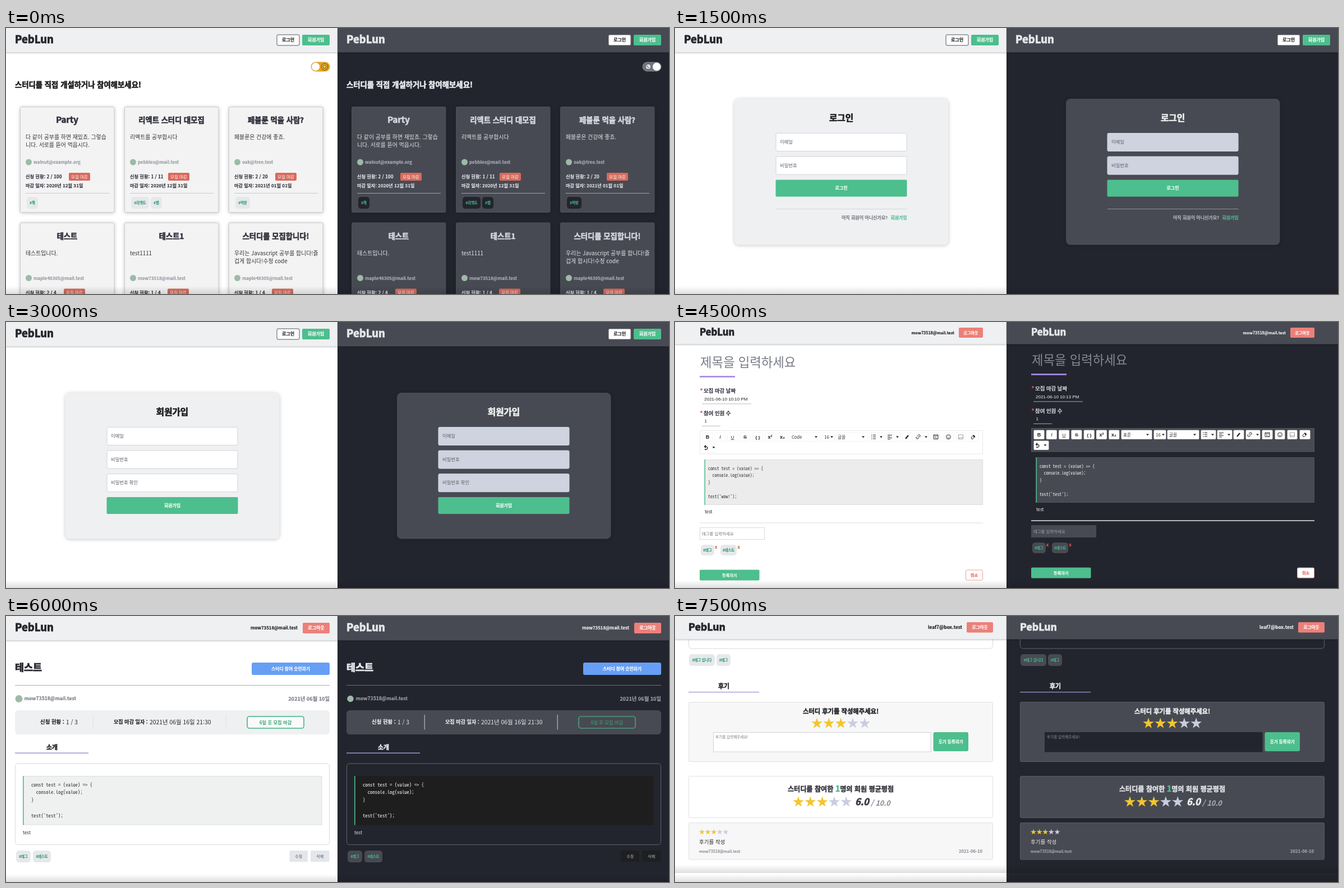
Animation of 1182 by 474 pixels, one loop 8 s. Source, as an HTML page:

```html
<!DOCTYPE html>
<html lang="ko">
<head>
<meta charset="utf-8">
<title>Study board</title>
<style>
html, body { margin: 0; width: 100%; height: 100%; overflow: hidden; background: #fff; }
svg { display: block; width: 1182px; height: 474px; }
text { font-family: "Noto Sans CJK KR", "Noto Sans CJK", "Noto Sans CJK JP", "Noto Sans", sans-serif; white-space: pre; }
text.mono { font-family: "Noto Sans Mono CJK KR", "Noto Sans Mono", monospace; font-weight: 500; }
text.arial { font-family: "Liberation Sans", Arial, sans-serif; }
.shadow { filter: drop-shadow(0 1px 3px rgba(0,0,0,.22)); }
.bar { filter: drop-shadow(0 1px 1px rgba(0,0,0,.28)); }
</style>
</head>
<body>
<svg id="stage" viewBox="0 0 1182 474">
  <defs>
    <linearGradient id="fade" x2="0" y2="1">
      <stop offset="0" stop-opacity="0"/>
      <stop offset="1" stop-opacity=".13"/>
    </linearGradient>
  </defs>
</svg>
<script>
const stage = document.getElementById('stage');
const HALF = 591, STEP = 1500, LOOP = 8000;
const GREEN = '#4dbe8d', CORAL = '#ec8079', VIOLET = '#a78bea', LILAC = '#a091d6';
const BRAND = 'PebLun', MEMBER = 'mow73518@mail.test', AUTHOR = 'maple48305@mail.test';

// Advance of one monospace letter at a font size of one pixel.
const pen = document.createElement('canvas').getContext('2d');
pen.font = '500 100px "Noto Sans Mono CJK KR", "Noto Sans Mono", monospace';
const MONO_EM = pen.measureText('m').width / 100;

let parent = stage, dark = false;
const pick = (light, night) => dark ? night : light;

function add(tag, attrs, content) {
  const el = document.createElementNS('http://www.w3.org/2000/svg', tag);
  for (const key in attrs) el.setAttribute(key, attrs[key]);
  if (content !== undefined) el.textContent = content;
  return parent.appendChild(el);
}
function group(attrs, draw) {
  const outer = parent;
  const el = parent = add('g', attrs);
  draw();
  parent = outer;
  return el;
}
// Boxes are given by their edges.
const box = (x1, y1, x2, y2, fill, opt = {}) =>
  add('rect', { x: x1, y: y1, width: x2 - x1, height: y2 - y1, fill, ...opt });
const path = (d, stroke, opt = {}) => add('path', { d, stroke, fill: 'none', ...opt });
const circle = (cx, cy, r, fill, opt = {}) => add('circle', { cx, cy, r, fill, ...opt });
const text = (x, y, size, str, fill, opt = {}) =>
  add('text', { x, y, 'font-size': size, fill, ...opt }, str);
// A thin outline gives the heavy look of the display face.
const heavy = (ratio) => (x, y, size, str, fill, opt = {}) =>
  text(x, y, size, str, fill, { 'font-weight': 700, stroke: fill, 'stroke-width': size * ratio, ...opt });
const bold = heavy(.022), black = heavy(.045);
const MID = { 'text-anchor': 'middle' }, END = { 'text-anchor': 'end' };
const hline = (x1, x2, y, stroke, width = 1) =>
  path(`M${x1} ${y}H${x2}`, stroke, { 'stroke-width': width });

function button(x1, y1, x2, y2, label, size, fill, color = '#fff', opt = {}) {
  box(x1, y1, x2, y2, fill, { rx: 2, ...opt });
  bold((x1 + x2) / 2, (y1 + y2) / 2 + size * .36, size, label, color, MID);
}
function tag(x1, y1, x2, y2, label, night = '#484a53') {
  box(x1, y1, x2, y2, pick('#e6e8eb', night), { rx: 5 });
  bold((x1 + x2) / 2, (y1 + y2) / 2 + 2.2, 6.3, label, pick('#2f9b74', '#45b386'), MID);
}
function star(cx, cy, r, fill) {
  let d = '';
  for (let i = 0; i < 10; i++) {
    const a = (i / 5 - .5) * Math.PI, k = i % 2 ? r * .39 : r;
    d += (i ? 'L' : 'M') + (cx + k * Math.cos(a)).toFixed(2) + ' ' + (cy + k * Math.sin(a)).toFixed(2);
  }
  add('path', { d: d + 'Z', fill });
}
function stars(x, y, r, gap) {
  for (let i = 0; i < 5; i++) star(x + i * gap, y, r, i < 3 ? '#f2c530' : '#c8cde0');
}
const avatar = (x, y, r) => circle(x, y, r, '#9dbaa8');

function header(h, x, y, size) {
  box(0, 0, HALF, h, pick('#eff0f2', '#484a53'), { class: 'bar' });
  black(x, y, size, BRAND, pick('#26272c', '#e6e7eb'));
}
function guestHeader() {
  header(43.5, 16, 27, 18.6);
  button(483, 12, 523, 31, '로그인', 8, '#fff', '#222', { stroke: '#55575e' });
  button(528, 12, 577, 31, '회원가입', 8, GREEN);
}
function memberHeader(h, logo, mail, mailEnd, baseline, size, btn, btnSize) {
  header(h, ...logo);
  bold(mailEnd, baseline, size, mail, pick('#222', '#f0f0f3'), END);
  button(...btn, '로그아웃', btnSize, CORAL);
}
function code(x, [top, gap], advance, value) {
  const rows = ['const test = (value) => {', '  console.log(value);', '}', '', `test('${value}');`];
  rows.forEach((row, i) =>
    text(x, top + i * gap, advance / MONO_EM, row, pick('#2b2b2b', '#fff'), { class: 'mono' }));
}

function toggle() {
  box(544, 61, 577, 77, pick('#eda11f', '#71747d'), { rx: 8, stroke: pick('#c98a25', '#8b8d95'), 'stroke-width': .8 });
  circle(pick(552, 569), 69, 7.2, '#fff');
  if (dark) {
    circle(554, 69, 5, '#dcdee4', { stroke: '#4a4c55' });
    path('M552 66a4 4 0 0 0 4 5', '#555862');
  } else {
    circle(568, 69, 5.6, '#f6c343', { stroke: '#5b4316', 'stroke-width': 1.6, 'stroke-dasharray': '1.5 1' });
    circle(568, 69, 3, 'none', { stroke: '#5b4316', 'stroke-width': .9 });
  }
}
function card(x, y, { title, size = 13.3, desc, mail, count, badge, due, tags = [] }) {
  group({ transform: `translate(${x} ${y})` }, () => {
    const ink = pick('#3a3b48', '#dddfe6');
    box(.5, .5, 168, 188.5, pick('#f3f3f3', '#484a53'),
      { rx: 2, class: 'shadow', stroke: pick('#c9cace', '#4d4f58') });
    black(84, 29, size, title, pick('#33343f', '#d3d5de'), MID);
    desc.forEach((row, i) => text(10, 58 + i * 14.2, 9.9, row, pick('#333', '#e3e4ea')));
    avatar(15.5, 99, 5.5);
    bold(24, 102, 7.9, mail, pick('#9a9ca6', '#a9abb6'));
    bold(10, 128, 8.2, '신청 현황: ' + count, ink);
    box(badge, 118, badge + 38, 132, '#d96a5c', { rx: 2 });
    text(badge + 19, 127.7, 7.4, '모집 마감', '#fff', MID);
    if (!due) return;
    bold(10, 143.5, 8.15, '마감 일자: ' + due, ink);
    hline(10, 159, 154.5, pick('#c9cace', '#a0a2aa'));
    tags.forEach(([x1, x2, label]) => tag(x1, 161, x2, 182, label, '#23252e'));
  });
}
function listScene() {
  guestHeader();
  toggle();
  black(16, 106, 13.35, '스터디를 직접 개설하거나 참여해보세요!', pick('#222', '#e8e9ee'));
  const top = [
    { title: 'Party', size: 15, desc: ['다 같이 공부를 하면 재밌죠. 그렇습', '니다. 서로를 뜯어 먹읍시다.'],
      mail: 'walnut@example.org', count: '2 / 100', badge: 87, due: '2020년 12월 31일', tags: [[12, 32, '#책']] },
    { title: '리액트 스터디 대모집', desc: ['리액트를 공부합시다'],
      mail: 'pebbles@mail.test', count: '1 / 11', badge: 78, due: '2020년 12월 31일', tags: [[12, 44, '#리액트'], [47, 67, '#웹']] },
    { title: '페블룬 먹을 사람?', desc: ['페블룬은 건강에 좋죠.'],
      mail: 'oak@tree.test', count: '2 / 20', badge: 83, due: '2021년 01월 01일', tags: [[12, 38, '#먹방']] }
  ];
  const low = [
    { title: '테스트', desc: ['테스트입니다.'], mail: AUTHOR, count: '2 / 4', badge: 78 },
    { title: '테스트1', desc: ['test1111'], mail: MEMBER, count: '1 / 4', badge: 77 },
    { title: '스터디를 모집합니다!', desc: ['우리는 Javascript 공부를 합니다!즐', '겁게 합시다!수정 code'], mail: AUTHOR, count: '1 / 4', badge: 77 }
  ];
  top.forEach((c, i) => card(25 + i * 186, 140, c));
  low.forEach((c, i) => card(25 + i * 186, 346.5, c));
}

function formScene(title, fields) {
  guestHeader();
  box(106, 126, 487.5, 386.5, pick('#eff0f2', '#484a53'), { rx: 8, class: 'shadow' });
  black(296.5, 166, 15.6, title, pick('#222', '#eceded'), MID);
  fields.forEach((label, i) => {
    const y = 187.5 + i * 41.6;
    box(180, y, 413, y + 32, pick('#fff', '#ced3df'), { rx: 2, stroke: pick('#d0d4da', '#d3d8e3') });
    text(187, y + 18.7, 8.3, label, '#5d5f66');
  });
  const y = 187.2 + fields.length * 41.6;
  button(179.5, y, 413.5, y + 30, title, 7.9, GREEN);
}
function loginScene() {
  formScene('로그인', ['이메일', '비밀번호']);
  hline(180, 413.5, 322.5, pick('#d3d6da', '#8e9098'));
  bold(297, 341, 8, '아직 회원이 아니신가요?', pick('#7b7d85', '#b3b5be'));
  bold(413.5, 341, 7.9, '회원가입', GREEN, END);
}
function signupScene() {
  formScene('회원가입', ['이메일', '비밀번호', '비밀번호 확인']);
}

function toolbar() {
  box(44.5, 193.5, 548.5, 235, pick('#fff', '#484a53'), { stroke: pick('#e9e9eb', '#53555e') });
  const ink = '#222';
  const cell = (x1, x2, y = 197) =>
    box(x1, y, x2, y + 15.5, '#fff', { rx: 1, stroke: pick('#f1f1f3', '#fff'), 'stroke-width': .8 });
  const arrow = (x, y = 204.7) => add('path', { d: `M${x - 2.5} ${y - 1.3}h5l-2.5 3z`, fill: ink });
  const glyph = (x, str, opt = {}) => text(x, 208, 9, str, ink, { ...MID, class: 'arial', ...opt });
  const draw = (d, opt) => path(d, ink, opt);
  for (let i = 0; i < 7; i++) cell(49 + i * 22.3, 67 + i * 22.3);
  [[205, 259], [263, 284], [287, 343], [347, 373], [376, 402], [405, 423], [427, 452],
   [456, 474], [479, 496], [501, 518], [523, 541]].forEach(([a, b]) => cell(a, b));
  cell(49, 75, 216);
  glyph(58, 'B', { 'font-weight': 700 });
  glyph(80.5, 'I', { 'font-style': 'italic' });
  glyph(102.5, 'U', { 'text-decoration': 'underline', 'font-size': 8 });
  glyph(125, 'S', { 'text-decoration': 'line-through' });
  glyph(147.5, '{ }', { 'font-weight': 700, 'font-size': 8 });
  glyph(169.5, 'x²', { 'font-weight': 700 });
  glyph(191.5, 'x₂', { 'font-weight': 700 });
  text(208, 207.5, 7.6, pick('Code', '표준'), '#333');
  text(266, 207.5, 8, '16', '#333');
  text(290, 207.5, 7.6, '글꼴', '#333');
  [251.5, 279.5, 335.5, 367.5, 396.5, 447.5].forEach(x => arrow(x));
  draw('M350 201.5h1.5M350 204.7h1.5M350 208h1.5M353 201.5h5M353 204.7h5M353 208h5');
  draw('M379 201.5h8M379 204h5M379 206.5h8M379 209h5', { 'stroke-width': .9 });
  draw('M411 208l5-6', { 'stroke-width': 2.2 });
  draw('M432.5 205.5l2-2M432 203l2-2q2-1 3 1t-2 3M435 206l-2 2q-2 1-3-1t1-2.5');
  draw('M461 201h8v7.5h-8zM461 203h8M463 205l1.5 1-1.5 1M465.5 207h2', { 'stroke-width': .9 });
  draw('M491.5 204.8a4 4 0 1 0-8 0a4 4 0 1 0 8 0M485.5 206q2 2 4 0M486 203.3v1M489 203.3v1', { 'stroke-width': .9 });
  path('M505.5 201h8v7.5h-8zM506 208l2.5-3 2 2 1.5-1.5 1.5 2', '#888', { 'stroke-width': .8 });
  draw('M528 206l4-4.5 3 2.5-4 4.5h-2z');
  add('path', { d: 'M531 202.5l1-1 3 2.5-2 2z', fill: ink });
  draw('M53 222h3a2.8 2.8 0 1 1-3 4.5M55 219.5l-2.5 2.5 2.5 2.5', { 'stroke-width': 1.3 });
  arrow(69, 223.6);
}
function writeScene() {
  memberHeader(39.5, [44, 24, 16.8], MEMBER, 498, 21.5, 7.1, [506, 10, 549, 28], 7);
  group({ transform: `translate(0 ${pick(0, -4)})` }, () => {
    const label = pick('#3c3d46', '#c9cbd3'), value = pick('#222', '#f2f2f5');
    const rule = pick('#b9bbc2', '#a5a7b0');
    text(45, 80, 22.3, '제목을 입력하세요', pick('#777a84', '#858892'));
    box(44, 96, 107, 98.7, VIOLET);
    [[126, '모집 마감 날짜'], [165.5, '참여 인원 수']].forEach(([y, str]) => {
      bold(44.5, y, 10, '*', '#e2574c');
      bold(51, y, 9.4, str, label);
    });
    text(52, 139.5, 8, pick('2021-06-10 10:10 PM', '2021-06-10 10:13 PM'), value, { class: 'arial' });
    text(52.5, 179, 8, '1', value, { class: 'arial' });
    hline(48, 136, 145.8, rule);
    hline(48, 81, 185.3, rule);
    toolbar();
    box(53, 245.5, 548.5, 325.5, pick('#ececec', '#484a53'), { stroke: pick('#dedede', '#4f515a') });
    box(52.5, 245, 54, 326, GREEN);
    code(59, [263.5, 12.6], 3.93, pick('wow!', 'test'));
    text(53, 341, 7.8, 'test', value);
    hline(44, 549, 358, pick('#dcdde0', '#e4e5ea'), pick(1, 1.6));
    box(44.5, 366.5, 159.5, 387.5, pick('#fff', '#484a53'), { stroke: pick('#d8dade', '#484a53') });
    text(48, 379.7, 7.4, '태그를 입력하세요', pick('#777', '#a0a2ab'));
    tag(46, 397, 70, 416, '#태그');
    tag(81, 397, 110, 416, '#테스트');
    [73, 113.5].forEach(x => bold(x, 403.5, 7.5, 'x', '#e2574c', MID));
    button(44, 441.5, 150.5, 460.5, '등록하기', 7.2, GREEN);
    button(518.5, 442, 548.5, 460, '취소', 7.4, '#fff', '#e2625b', { stroke: '#eba09b' });
  });
}

function detailScene() {
  memberHeader(43.5, [16, 27, 18.6], MEMBER, 520, 24, 7.8, [529, 12, 577, 31], 8);
  const ink = pick('#26272c', '#e8e9ee'), soft = pick('#7d7f89', '#9a9ca6');
  black(16, 98, 17.4, '테스트', ink);
  button(438, 83, 577, 105, '스터디 참여 승인하기', 7.8, '#669ff5', '#fff', { rx: 3 });
  hline(16, 577, 123.5, pick('#a9abb3', '#6f717a'));
  avatar(23, 147.5, pick(6.5, 5.7));
  bold(32.5, 150.3, 8.6, MEMBER, soft);
  bold(577, 150.5, 9.2, '2021년 06월 10일', soft, END);
  box(16, 168, 577, 211, pick('#eff0f2', '#484a53'), { rx: 6 });
  bold(61, 192, 9.4, '신청 현황 :', ink);
  text(107, 192.5, 10.2, '1 / 3', ink);
  bold(192, 192, 9.1, '모집 마감 일자 :', ink);
  text(256, 192.5, 10.4, '2021년 06월 16일 21:30', ink);
  path('M155.2 176V202.5M392.2 176V202.5', pick('#e0e1e4', '#cfd0d6'));
  box(430, 179, 531, 200, pick('#fafafa', 'none'), { rx: 4, stroke: pick('#3fb585', GREEN), 'stroke-width': pick(1.6, 1.2) });
  text(480.5, 192.5, 8.3, '6일 후 모집 마감', '#3aa679', { ...MID, 'font-weight': pick(700, 400) });
  black(82, 237.7, 10.9, '소개', ink, MID);
  hline(16, 147, 244.2, LILAC, 1.4);
  box(16.5, 263, 576.5, 407.5, 'none', { rx: 5, stroke: pick('#d8dade', '#62646d') });
  box(30.5, 285.5, 563, 372, pick('#eff0f0', '#1e1e1e'), { stroke: pick('#dcdddf', '#1e1e1e') });
  box(30, 285, 31.6, 372.5, GREEN);
  code(45, [303.7, 13.7], 4.37, 'test');
  text(30, 389, 8, 'test', ink, { 'font-weight': 500 });
  tag(18, 418, 44, 439, '#태그');
  tag(48, 418, 80, 439, '#테스트');
  [[505.5, 538, '수정'], [543, 576.5, '삭제']].forEach(([a, b, str]) => {
    box(a, 418, b, 438, pick('#e3e6eb', '#1e1f21'), { rx: 1 });
    text((a + b) / 2, 430.5, 7, str, pick('#555', '#b8bac2'), MID);
  });
}

function reviewScene() {
  const ink = pick('#26272c', '#eceded'), edge = pick('#e0e1e4', '#5a5c65');
  const soft = pick('#94969f', '#a3a5ae'), fill = pick('#f7f7f7', '#484a53');
  path('M24.5 40V53a5 5 0 0 0 5 5H561.5a5 5 0 0 0 5-5V40', pick('#d8dade', '#62646d'));
  memberHeader(41.5, [24, 25.5, 17.8], 'leaf7@box.test', 512, 22.7, 8.2, [520, 11, 567, 29.5], 7.6);
  tag(25, 68, 71, 89, '#태그 입니다');
  tag(74, 68, 99, 89, '#태그');
  black(87, 129, 10.9, '후기', ink, MID);
  hline(24, 150, 135.7, LILAC, 1.3);
  const panel = (y1, y2, color) => box(24.5, y1, 566.5, y2, color, { rx: 2, stroke: edge });
  panel(153.5, 259.5, fill);
  black(295.5, 174, 11.3, '스터디 후기를 작성해주세요!', ink, MID);
  stars(253, 191.5, 10.3, 21.3);
  box(68.5, 207.5, 456, 242, pick('#fff', '#23252e'), { stroke: pick('#cfd2d9', '#23252e') });
  text(72, 217.5, 6.6, '후기를 입력해주세요!', pick('#777', '#8b8d97'));
  button(460.5, 207, 523, 241, '후기 등록하기', 7.6, GREEN, '#fff', { rx: 3 });
  panel(285.5, 359.5, pick('#fff', '#484a53'));
  const title = black(295.5, 313, 12.1, '스터디를 참여한 ', pick('#3a3b42', '#dcdde3'), MID);
  const outer = parent;
  parent = title;
  add('tspan', { fill: GREEN, stroke: GREEN, 'font-size': 14.5 }, '1');
  add('tspan', {}, '명의 회원 평균평점');
  parent = outer;
  stars(220, 331.5, 10.3, 21.3);
  black(321, 337.3, 16.5, '6.0', pick('#3a3b42', '#eceded'), { 'font-style': 'italic' });
  bold(349, 337.5, 12.5, '/ 10.0', soft, { 'font-style': 'italic' });
  panel(368.5, 434, fill);
  stars(48, 385, 5.2, 10.6);
  text(43, 406.3, 9.5, '후기를 작성', ink);
  bold(43, 421.5, 6.8, MEMBER, soft);
  bold(548, 421.5, 7.7, '2021-06-10', soft, END);
  box(0, 443, HALF, 458, 'url(#fade)');
  box(0, 458, HALF, 474, pick('#fff', '#23252e'));
}

const scenes = [listScene, loginScene, signupScene, writeScene, detailScene, reviewScene].map(draw =>
  group({ display: 'none' }, () => {
    for (const side of [0, 1]) {
      dark = side === 1;
      group({ transform: `translate(${side * HALF} 0)` }, () => {
        box(0, 0, HALF, 474, pick('#fff', '#23252e'));
        draw();
        box(0, 460, HALF, 474, 'url(#fade)');
      });
    }
  }));

function render(ms) {
  const current = Math.floor((ms % LOOP) / STEP);
  scenes.forEach((el, i) => el.setAttribute('display', i === current ? 'inline' : 'none'));
}
const start = performance.now();
function tick() {
  render(performance.now() - start);
  requestAnimationFrame(tick);
}
render(0);
requestAnimationFrame(tick);
</script>
</body>
</html>
```
